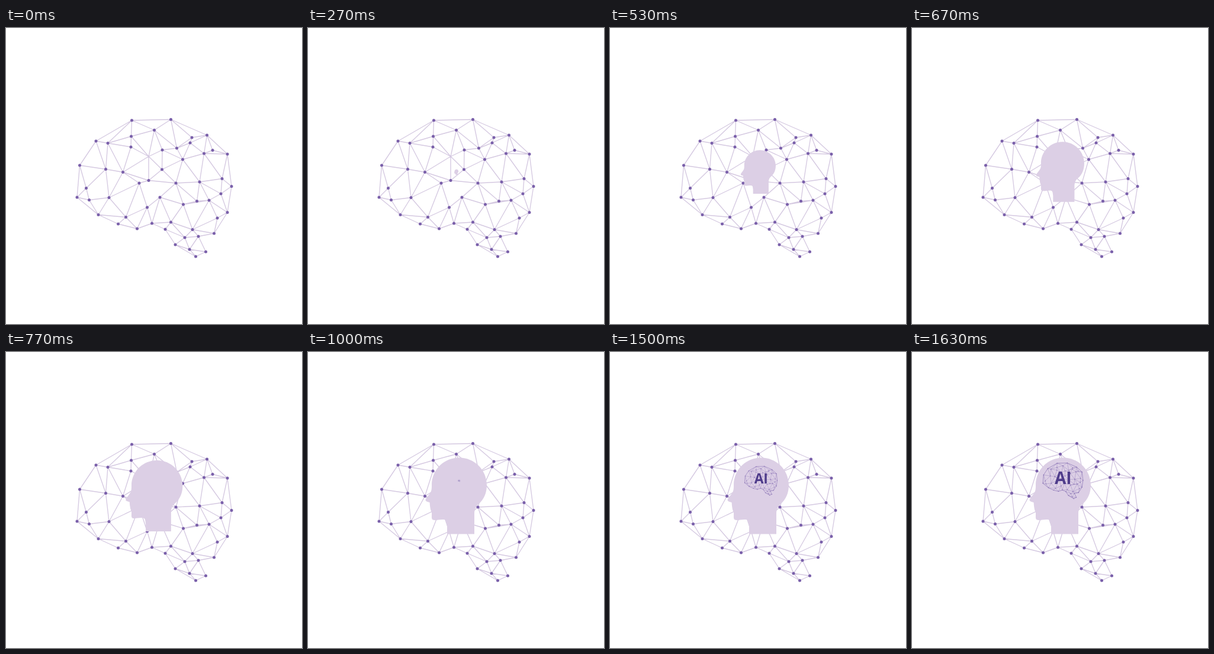
An HTML page that plays this animation: 500x500 px, repeating every 1.93 s.

```html
<!DOCTYPE html>
<html lang="en">
<head>
<meta charset="utf-8">
<title>AI brain</title>
<style>
  html, body { margin: 0; width: 100%; height: 100%; overflow: hidden; background: #fff; }
  svg { display: block; width: 100%; height: 100%; fill: none; }
  .links { stroke: #d5c9e1; stroke-width: 1.35; }
  .dots { stroke: #7a60aa; stroke-width: 5; stroke-linecap: round; }
  #brain .links { stroke: #8069b0; stroke-width: 1.4; }
  #head { fill: #dccfe5; }
  text { fill: #4f3c8b; font: 700 28px "Open Sans", sans-serif; text-anchor: middle; }
</style>
</head>
<body>
<svg viewBox="0 0 500 500">
  <defs>
    <path id="links"/>
    <path id="dots"/>
  </defs>
  <use href="#links" class="links"/>
  <use href="#dots" class="dots"/>
  <g id="head">
    <path d="M235 307.600V294C234 288 234.500 283 229 283C222 282.500 215 285 211 283.500
      C208 282 209.300 277 209 272L207 266L206 260L205.500 254
      C202 253 198.500 252.500 198.500 250C199 247 206 240 208 235C209 232 209 228 209 224.500
      C209 198.500 230 178.400 255.500 178.400S302 199 302 225C302 238 297 249 289 256
      C283 261 281 266 281 274V307.600Z"/>
  </g>
  <g id="brain">
    <g transform="translate(255 217.500) scale(.26) translate(-250.500 -270)">
      <use href="#links" class="links"/>
      <use href="#dots" class="dots"/>
    </g>
    <text x="255.300" y="223">AI</text>
  </g>
</svg>
<script>
  const byId = id => document.getElementById(id);

  const rim = [
    [120, 286], [124.5, 232], [152, 191], [212.5, 156], [278.5, 154.5], [339.5, 181],
    [374, 213], [381, 267.5], [374, 311.5], [351.5, 347], [325, 352], [337.5, 378],
    [320.5, 386], [286, 366], [269, 340], [246.5, 330], [221.5, 339], [189.5, 331],
    [156, 315.5]
  ];
  const inside = [
    [172, 194.5], [211.5, 183], [250.5, 172.5], [211, 201], [264, 206], [288.5, 203],
    [314, 185], [311, 194], [349, 206.5], [334.5, 212], [298.5, 222], [263.5, 239],
    [241, 257.5], [225, 262], [197.5, 243.5], [168.5, 238.5], [135.5, 270.5], [140.5, 290.5],
    [174, 286.5], [202.5, 319.5], [238.5, 303], [260, 286], [287, 262], [327, 260],
    [365, 254.5], [363, 280], [343, 291], [322.5, 292.5], [299.5, 298], [278.5, 328],
    [315, 340.5], [357, 321], [302, 354], [310, 374]
  ];
  const knot = [241, 217]; // a crossing of links without a dot
  const gaps = [[251, 270], [155, 271]];
  const GAP_RADIUS = 16;

  const distance = ([ax, ay], [bx, by]) => Math.hypot(bx - ax, by - ay);
  const middle = ([a, b]) => [(a[0] + b[0]) / 2, (a[1] + b[1]) / 2];
  const side = (a, b, c) => (b[0] - a[0]) * (c[1] - a[1]) - (b[1] - a[1]) * (c[0] - a[0]);
  const crosses = ([a, b], [c, d]) =>
    side(a, b, c) * side(a, b, d) < 0 && side(c, d, a) * side(c, d, b) < 0;

  // Greedy triangulation: the shortest links come first, later ones may not cross them.
  function triangulate(points) {
    const shape = new Path2D(`M${rim.join("L")}Z`);
    const context = document.createElement("canvas").getContext("2d");
    const links = rim.map((p, i) => [p, rim[(i + 1) % rim.length]]);
    const pairs = points.flatMap((a, i) => points.slice(i + 1).map(b => [a, b]));
    pairs.sort((p, q) => distance(...p) - distance(...q));
    for (const pair of pairs) {
      if (context.isPointInPath(shape, ...middle(pair)) &&
          !links.some(link => crosses(link, pair))) links.push(pair);
    }
    return links.filter(link => gaps.every(gap => distance(gap, middle(link)) > GAP_RADIUS));
  }

  const dots = [...rim, ...inside];
  byId("links").setAttribute("d", triangulate([...dots, knot]).map(([a, b]) => `M${a}L${b}`).join(""));
  byId("dots").setAttribute("d", dots.map(p => `M${p}h0`).join(""));

  const LOOP = 1930;

  function grow(id, x, y, scale) {
    const s = Math.min(1, Math.max(0, scale));
    byId(id).setAttribute("transform", `translate(${x} ${y}) scale(${s}) translate(${-x} ${-y})`);
  }

  // Motion runs at 24 steps per second, shown on a 30 per second clock.
  function draw(now) {
    const tick = Math.floor((now % LOOP + 4) * 0.03);
    const step = Math.floor(tick * 0.8 + 0.3);
    grow("head", 250.5, 243.3, (step - 5) / 14);
    grow("brain", 255, 217.5, (step - 23) / 16);
  }

  let start;
  function frame(now) {
    start ??= now;
    draw(now - start);
    requestAnimationFrame(frame);
  }
  draw(0);
  requestAnimationFrame(frame);
</script>
</body>
</html>
```
